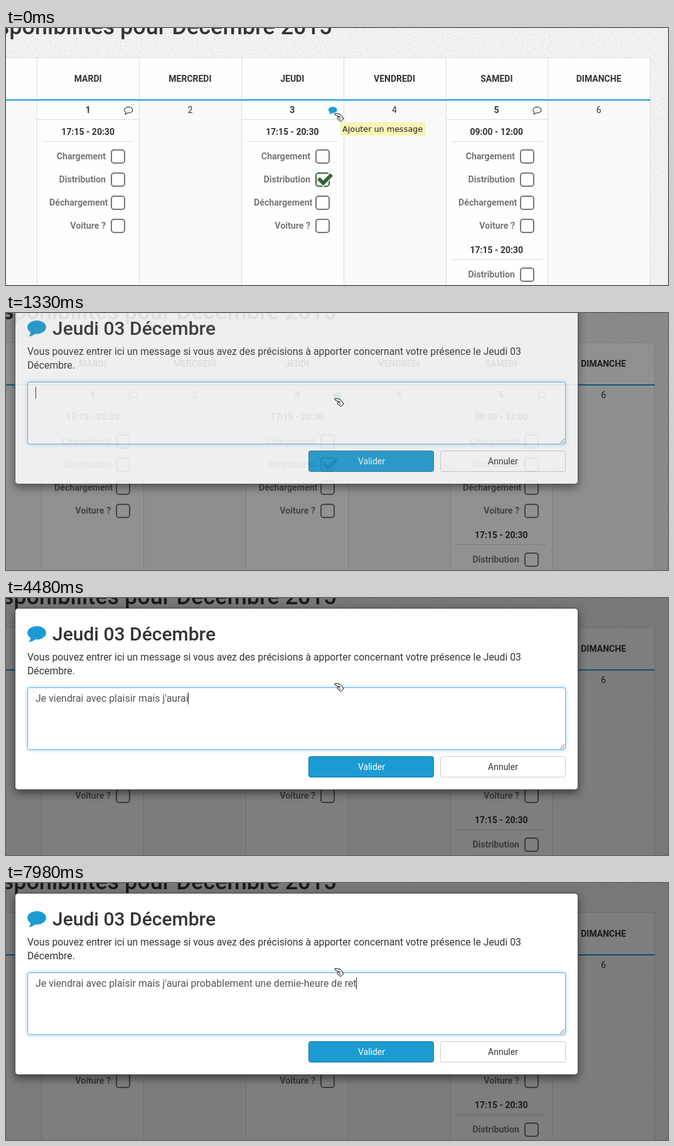
Animation of 1055x411 px, one loop 8 s. Source, as an HTML page:

```html
<!DOCTYPE html>
<html lang="fr">
<head>
<meta charset="utf-8">
<title>Disponibilités</title>
<style>
  html, body { margin: 0; width: 100%; height: 100%; overflow: hidden; background: #f8f8f8; }
  svg { display: block; font: 14px Roboto, sans-serif; fill: #333; }
  text { white-space: pre; }
  .bold { font-weight: 700; }
  .title { font-weight: 500; }
  .label { font-weight: 700; font-size: 14.2px; fill: #777; }
  .mid { text-anchor: middle; }
  .end { text-anchor: end; }
  .body { font-size: 15.8px; }
  .typed { font-size: 15.9px; fill: #555; }
  .tip { font: 12.8px "DejaVu Sans", sans-serif; fill: #222; }
  .dialog { filter: drop-shadow(0 5px 7px rgba(0, 0, 0, .5)); }
  .focus { filter: drop-shadow(0 0 3px rgba(102, 175, 233, .6)); }
</style>
</head>
<body>
<svg id="stage" width="1055" height="411"></svg>
<script>
const BLUE = '#1c9bd3', GREEN = '#356635', GREY = '#777';
const BUBBLE = 'M12.5 21.25Q8.5 24.8 2.4 25.6Q4.8 22.5 5.2 18.8A15 10.7 0 1 1 12.5 21.25Z';

const text = (x, y, str, cls = '', attrs = '') => `<text x="${x}" y="${y}" class="${cls}" ${attrs}>${str}</text>`;
const rect = (x, y, w, h, fill, attrs = '') =>
  `<rect x="${x}" y="${y}" width="${w}" height="${h}" fill="${fill}" ${attrs}/>`;
const frame = (x, y, w, h, r, fill, stroke, attrs = '') =>
  rect(x + .5, y + .5, w - 1, h - 1, fill, `rx="${r}" stroke="${stroke}" ${attrs}`);
const path = (d, attrs) => `<path d="${d}" ${attrs}/>`;
const bubble = (x, y, scale, attrs) => path(BUBBLE, `transform="translate(${x} ${y}) scale(${scale})" ${attrs}`);

function option(center, y, label, checked) {
  const x = Math.round(center + 36.8);
  const overflows = label === 'Déchargement';
  let out = text(overflows ? x - 98 : x - 8, y + 5, label, overflows ? 'label' : 'label end') +
    rect(x + 1, y - 10, 21, 21, 'none', `rx="4" stroke="${checked ? GREEN : GREY}" stroke-width="2"`);
  if (checked) {
    const tick = `M${x + 5} ${y - 1.5}l7.5 7.5 13.5 -13.5`;
    out += path(tick, 'fill="none" stroke="#fefefe" stroke-width="9"') +
      path(tick, `fill="none" stroke="${GREEN}" stroke-width="6"`);
  }
  return out;
}

const slot = (center, y, hours) =>
  text(center, y + 5, hours, 'bold mid') + rect(Math.round(center - 73), y + 15, 146, 1, '#ddd');

function calendar(shift) {
  const edge = k => Math.round(49.35 + 162.8 * k) + Math.floor(shift);
  const right = edge(6);
  let out = text(519.5 + Math.floor(shift), 10, 'Disponibilités pour Décembre 2015', 'title end', 'font-size="36"') +
    rect(0, 47, right, 364, '#f9f9f9') + rect(0, 47, right, 68, '#fdfdfd') + rect(0, 47, right, 1, '#ddd');
  ['MARDI', 'MERCREDI', 'JEUDI', 'VENDREDI', 'SAMEDI', 'DIMANCHE'].forEach((day, k) => {
    const x = edge(k), center = 130.65 + 162.8 * k + shift, open = k % 2 === 0;
    if (open) out += rect(x, 115, edge(k + 1) - x, 296, '#fefefe') + rect(x, 146, edge(k + 1) - x, 1, '#ddd');
    out += rect(x, 47, 1, 364, '#ddd') + text(center, 86, day, 'bold mid') +
      text(center, 136, k + 1, open ? 'bold mid' : 'mid');
    if (!open) return;
    out += k === 2
      ? bubble(center + 57.5, 126, .467, `fill="${BLUE}"`)
      : bubble(center + 58, 126.4, .44, 'fill="none" stroke="#333" stroke-width="2.4"');
    out += slot(center, 166, k === 4 ? '09:00 - 12:00' : '17:15 - 20:30');
    ['Chargement', 'Distribution', 'Déchargement', 'Voiture ?'].forEach((label, i) => {
      out += option(center, 205 + 37 * i, label, k === 2 && i === 1);
    });
    if (k === 4) out += slot(center, 355, '17:15 - 20:30') + option(center, 394, 'Distribution');
  });
  return out + rect(right, 47, 1, 364, '#ddd') + rect(0, 114, right + 1, 2, BLUE);
}

const dialog =
  frame(14, 16, 898, 291, 5, '#fff', '#505050', 'class="dialog"') +
  bubble(34, 45, 1, `fill="${BLUE}"`) +
  text(74, 68, 'Jeudi 03 Décembre', 'title', 'font-size="30"') +
  text(34, 100, 'Vous pouvez entrer ici un message si vous avez des précisions à apporter concernant votre présence le Jeudi 03', 'body') +
  text(34, 122, 'Décembre.', 'body') +
  frame(34, 143, 858, 100, 3, '#fff', '#ccc') +
  frame(34, 143, 858, 100, 3, '#fff', '#5fade6', 'class="focus" id="focus"') +
  path('M883 241l7 -7M887 241l3 -3', 'stroke="#666"') +
  text(47, 166, '', 'typed', 'id="message"') +
  rect(47, 151, 1, 19, '#333', 'id="caret"') +
  frame(482, 253, 200, 34, 3, BLUE, '#1878a6') + text(582.5, 275, 'Valider', 'mid', 'fill="#fff"') +
  frame(692, 253, 200, 34, 3, '#fff', '#ccc') + text(792, 275, 'Annuler', 'mid');

const pointer = `<g transform="translate(523 136)" stroke="#000">` +
  path('M1 .8L6 1Q11 1.5 13 6L14.8 9 10.5 13.8 8.5 12 6.5 10.5 5 8.5Q4.5 7 7 6L1.5 3Q0 1.5 1 .8Z', 'fill="#fff"') +
  path('M7 6l3 -.6M7 8.3l2.5 -1M8.5 10.4l2 -1', 'fill="none"') + '</g>';

const stage = document.getElementById('stage');
stage.innerHTML = `
  <filter id="paper" x="0" y="0" width="1" height="1">
    <feTurbulence type="fractalNoise" baseFrequency=".4" numOctaves="2" seed="4"/>
    <feColorMatrix values="0 0 0 0 0  0 0 0 0 0  0 0 0 0 0  .12 0 0 0 -.03"/>
  </filter>` +
  rect(0, 0, 1055, 411, '#000', 'filter="url(#paper)"') +
  `<g id="before">${calendar(0)}</g><g id="after">${calendar(7.5)}</g>` +
  `<g id="tooltip">${rect(533, 151, 135, 21, '#f5f5b5')}${text(536, 166, 'Ajouter un message', 'tip')}</g>` +
  rect(0, 0, 1055, 411, '#000', 'id="backdrop"') +
  `<g id="modal">${dialog}</g>` + pointer;

const [before, after, tooltip, backdrop, modal, focus, message, caret] =
  ['before', 'after', 'tooltip', 'backdrop', 'modal', 'focus', 'message', 'caret']
    .map(id => document.getElementById(id));

// Keystrokes, where "<" is a backspace; each burst is [start ms, ticks, keys pressed by its end]
const KEYS = "Je viendrai avec plaisir mais j'aurai probablement une demi-<e-heure de ret";
const BURSTS = [
  [2100, 12, 12], [2940, 3, 15], [3220, 12, 28], [4060, 2, 31], [4270, 4, 37], [4690, 1, 38], [4900, 4, 42],
  [5250, 8, 50], [5880, 4, 55], [6300, 4, 60], [6720, 1, 61], [6860, 2, 64], [7070, 7, 72], [7840, 3, 75],
];
const LOOP = 8000, TICK = 70, OPENING = 1208;

function typed(t) {
  let keys = 0;
  for (const [start, ticks, end] of BURSTS) {
    if (t < start) break;
    const done = Math.min(ticks, Math.floor((t - start) / TICK) + 1);
    keys += Math.floor((end - keys) * done / ticks);
  }
  return KEYS.slice(0, keys).replace(/.</, '');
}

const clamp = v => Math.max(0, Math.min(1, v));
const show = (el, on) => el.setAttribute('display', on ? 'inline' : 'none');

function draw(t) {
  const fade = clamp((t - OPENING) / 142);
  const slide = clamp((t - OPENING) / 300);
  show(before, t < 1190);
  show(after, t >= 1190);
  show(tooltip, t < 1120);
  backdrop.setAttribute('opacity', fade / 2);
  modal.setAttribute('opacity', fade);
  modal.setAttribute('transform', `translate(0 ${Math.round(-72.75 * (1 - slide) ** 1.5)})`);
  focus.setAttribute('opacity', fade);
  message.textContent = typed(t);
  caret.setAttribute('x', 47 + Math.floor(message.getComputedTextLength()));
  show(caret, t < 1890 || t >= 2100);
}

let last = -1;
function tick() {
  const t = Math.floor(performance.now() % LOOP / TICK) * TICK;
  if (t !== last) draw(last = t);
  requestAnimationFrame(tick);
}
tick();
</script>
</body>
</html>
```
